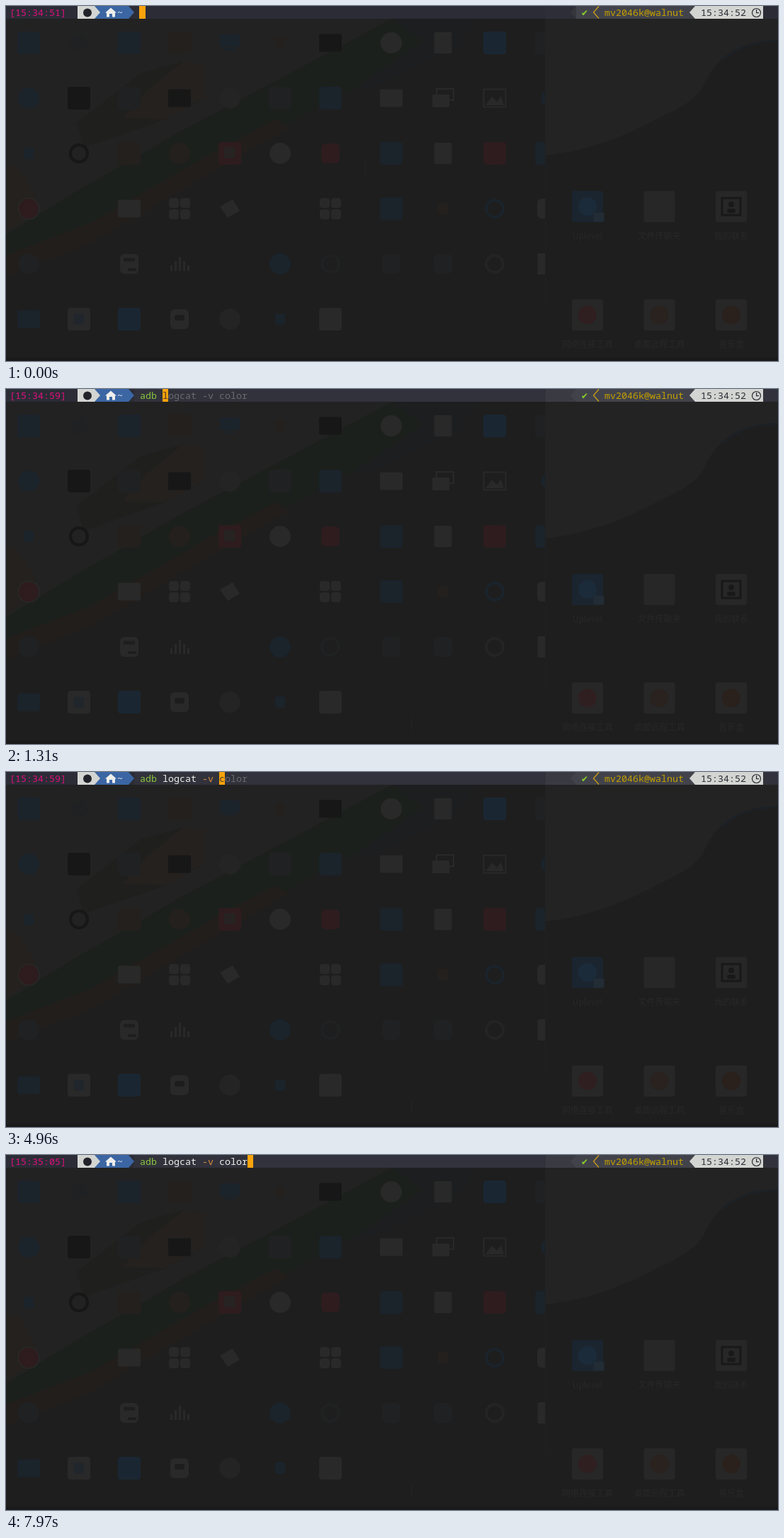
An HTML page with a canvas that plays this animation: 1090x501 px, repeating every 8 s.

```html
<!DOCTYPE html>
<html lang="en">
<head>
<meta charset="utf-8">
<title>Terminal</title>
<style>
  html, body { margin: 0; width: 100%; height: 100%; overflow: hidden; background: #1e1e1e; }
  canvas { display: block; width: 1090px; height: 501px; }
</style>
</head>
<body>
<canvas id="stage" width="1090" height="501"></canvas>
<script>
const W = 1090, H = 501, LOOP = 8000, CELL = 8, BAR = 18, INPUT_X = 189;
const MONO = '13.33px "Noto Sans Mono", "DejaVu Sans Mono", monospace';
const COMMAND = 'adb logcat -v color';

const stage = document.getElementById('stage').getContext('2d');
const backdrop = document.createElement('canvas');
backdrop.width = W;
backdrop.height = H;
let g = backdrop.getContext('2d');

function rect(x, y, w, h, color) {
  g.fillStyle = color;
  g.fillRect(x, y, w, h);
}

function poly(color, ...pts) {
  g.fillStyle = color;
  g.beginPath();
  for (let i = 0; i < pts.length; i += 2) g.lineTo(pts[i], pts[i + 1]);
  g.fill();
}

function disc(x, y, r, color) {
  g.fillStyle = color;
  g.beginPath();
  g.arc(x, y, r, 0, 7);
  g.fill();
}

function ring(x, y, r, color, width) {
  g.strokeStyle = color;
  g.lineWidth = width;
  g.beginPath();
  g.arc(x, y, r, 0, 7);
  g.stroke();
}

function box(x, y, w, h, r, color) {
  g.fillStyle = color;
  g.beginPath();
  g.roundRect(x - w / 2, y - h / 2, w, h, r);
  g.fill();
}

function frame(x, y, w, h, color, width = 2) {
  g.strokeStyle = color;
  g.lineWidth = width;
  g.strokeRect(x - w / 2, y - h / 2, w, h);
}

function text(str, x, y, color, font = MONO) {
  g.font = font;
  g.fillStyle = color;
  g.fillText(str, x, y);
}

// ---- dimmed desktop ----

const TINT = {
  l: '#292929', g: '#242424', k: '#171717', b: '#1b232b',
  B: '#1a2733', r: '#2e1c1e', n: '#24201d', f: '#202122'
};

const SHAPE = {
  s: (x, y, c) => box(x, y, 32, 32, 4, c),
  h: (x, y, c) => box(x, y, 26, 28, 6, c),
  t: (x, y, c) => box(x, y, 14, 16, 3, c),
  c: (x, y, c) => disc(x, y, 15, c),
  w: (x, y, c) => box(x, y, 32, 25, 2, c),
  p: (x, y, c) => box(x, y, 25, 30, 2, c),
  o: (x, y, c) => ring(x, y, 12, c, 4),
  d: (x, y, c) => poly(c, x - 14, y - 3, x + 4, y - 13, x + 14, y + 3, x - 3, y + 13),
  e: (x, y, c) => frame(x, y, 30, 26, c),
  // monitor
  m: (x, y, c) => { box(x, y - 3, 28, 18, 2, c); box(x, y + 9, 14, 3, 1, c); },
  // stacked windows
  v: (x, y, c) => { frame(x + 3, y - 5, 24, 16, c); box(x - 3, y + 4, 24, 18, 1, c); },
  // picture
  i: (x, y, c) => { frame(x, y, 31, 25, c); poly(c, x - 13, y + 10, x - 4, y - 2, x + 3, y + 5, x + 9, y - 3, x + 13, y + 10); },
  // level bars
  a: (x, y, c) => { for (let k = -2; k < 3; k++) { const h = 20 - 6 * Math.abs(k); rect(x + k * 6 - 1, y + 10 - h, 3, h, c); } },
  // four tiles
  q: (x, y, c) => { for (const u of [-8, 8]) for (const v of [-8, 8]) box(x + u, y + v, 14, 14, 4, c); }
};

const ICONS = [
  'sb df sb sn mb tn wk cl pl sB sf',
  'cb sk sf wk cg sf sb wl vl il tb',
  'tb ok sn cn sr cl hr sb pl sr sb',
  'or .. wl ql dl .. ql sb tn ob hl',
  'cf .. hl al .. cb of hf hf og pl',
  'wb sl sB hl cg tb sl'
];

function drawWallpaper() {
  rect(0, 0, W, H, '#1e1e1e');
  g.save();
  g.beginPath();
  g.rect(0, BAR, 762, H - BAR);
  g.clip();
  poly('#222222', 0, BAR, 545, BAR, 420, 85, 240, 180, 0, 325);
  poly('#1f1f1e', 100, 165, 190, 95, 250, 78, 282, 82, 280, 130, 225, 160, 110, 200);
  poly('#24211e', 165, 158, 200, 118, 250, 78, 282, 82, 282, 128, 225, 160);
  poly('#24211e', 0, 222, 18, 228, 42, 268, 30, 300, 0, 318);
  poly('#1c201c', 0, 322, 110, 255, 240, 182, 420, 85, 545, BAR, 632, BAR, 500, 112, 300, 218, 130, 318, 0, 372);
  poly('#221e1c', 0, 352, 120, 306, 290, 208, 380, 160, 400, 172, 290, 235, 120, 335, 0, 382);
  poly('#1c1e20', 545, BAR, 662, BAR, 640, 55, 520, 115, 490, 118, 590, 50);
  g.restore();

  g.fillStyle = '#232323';
  g.beginPath();
  g.moveTo(762, BAR);
  g.lineTo(762, 211);
  g.bezierCurveTo(835, 202, 880, 180, 930, 154);
  g.bezierCurveTo(1000, 122, 975, 110, 1010, 76);
  g.bezierCurveTo(1032, 55, 1060, 49, W, 48);
  g.lineTo(W, BAR);
  g.fill();
  g.strokeStyle = '#1c2126';
  g.lineWidth = 3;
  g.beginPath();
  g.moveTo(1012, 76);
  g.bezierCurveTo(1034, 56, 1060, 50, W, 49);
  g.stroke();
  rect(761, BAR, 1, 405, '#212121');
  rect(0, 496, W, 5, '#1a1a1a');
}

function drawIcons() {
  g.save();
  g.beginPath();
  g.rect(0, BAR, 761, H);
  g.clip();
  ICONS.forEach((row, r) => row.split(' ').forEach((code, c) => {
    if (code === '..') return;
    const x = c < 7 ? 32 + c * 71 : 544 + (c - 7) * 73;
    SHAPE[code[0]](x, 52 + r * 78, TINT[code[1]]);
  }));
  ring(32, 286, 15, '#292929', 1.5);
  disc(32, 286, 10, TINT.r);
  box(316, 207, 16, 16, 2, '#272323');
  box(174, 358, 16, 5, 1, '#1e1e1e');
  box(178, 372, 12, 4, 1, '#1e1e1e');
  box(103, 442, 15, 15, 3, '#20262b');
  box(245, 440, 14, 8, 3, '#1d1d1d');
  g.restore();
}

function drawShortcuts() {
  const labels = [['Uplevel', '文件传输夹', '我的联系'], ['网络连接工具', '桌面远程工具', '音乐盒']];
  const inner = ['#1c2b3a', '#282828', '#191919', '#301f20', '#29221e', '#2a201c'];
  g.textAlign = 'center';
  labels.forEach((row, r) => row.forEach((label, c) => {
    const x = 821 + c * 101.5, y = 283 + r * 153, k = r * 3 + c;
    box(x, y, 44, 44, 3, k ? '#272727' : '#1b2530');
    if (k === 2) {
      frame(x, y, 26, 24, inner[k], 3);
      disc(x, y - 3, 4, inner[k]);
      box(x, y + 6, 12, 6, 3, inner[k]);
    } else if (k !== 1) {
      disc(x, y, 13, inner[k]);
    }
    text(label, x, y + 46, '#282828', '12px "Noto Sans CJK SC", "Noto Sans CJK", sans-serif');
  }));
  box(837, 298, 15, 13, 2, '#222c35');
  g.textAlign = 'left';
}

// ---- prompt ----

function arrowRight(x, color) { poly(color, x, 0, x + 8, BAR / 2, x, BAR); }
function arrowLeft(x, color) { poly(color, x, 0, x - 8, BAR / 2, x, BAR); }

function drawBar(t) {
  const settled = t >= 1310;
  rect(0, 0, W, BAR, '#2b2c36');
  if (settled) {
    rect(181, 0, 581, BAR, '#31323b');
    rect(1069, 0, 21, BAR, '#31323b');
  }
  rect(762, 0, 43, BAR, settled ? '#3a3b42' : '#2d2e37');

  rect(101, 0, 24, BAR, '#d3d5d2');
  rect(125, 0, 48, BAR, '#3b66a3');
  arrowRight(125, '#d3d5d2');
  arrowRight(173, '#3b66a3');
  disc(115, 9.5, 6, '#22222a');
  poly('#eeeeec', 140, 9.5, 148, 2.5, 156, 9.5, 154, 9.5, 154, 15.5, 150, 15.5, 150, 11, 146, 11, 146, 15.5, 142, 15.5, 142, 9.5);
  text('~', 157, 14, '#eeeeec');

  arrowLeft(805, settled ? '#42434a' : '#36373d');
  rect(805, 0, 168, BAR, '#42434a');
  text('✔', 812, 14, '#8ad22c', '12px "DejaVu Sans", sans-serif');
  g.strokeStyle = '#d0a018';
  g.lineWidth = 1.2;
  g.beginPath();
  g.moveTo(837, 0.5);
  g.lineTo(829.5, 9);
  g.lineTo(837, 17.5);
  g.stroke();
  text('mv2046k@walnut', 845, 14, '#c4a000');

  rect(973, 0, 96, BAR, '#d3d5d2');
  arrowLeft(973, '#d3d5d2');
  text('15:34:52', 981, 14, '#2b2b33');
  ring(1059.5, 9.5, 6, '#2b2b33', 1.2);
  rect(1059, 5, 1.2, 5, '#2b2b33');
  rect(1059, 9, 4, 1.2, '#2b2b33');
}

// Key presses: time and the number of command letters typed so far.
const KEYS = [
  [0, 0], [920, 1], [1110, 2], [1160, 3], [1310, 4], [2300, 5], [2520, 6], [2800, 7],
  [3030, 8], [3280, 9], [3400, 10], [3510, 11], [4450, 12], [4820, 13], [4960, 14],
  [6640, 15], [7020, 16], [7260, 17], [7450, 18], [7970, 19]
];

function clockText(t) {
  if (t < 920) return '15:34:51';
  if (t < 5620) return '15:34:59';
  return t < 6320 ? '15:35:04' : '15:35:05';
}

function letterColor(i, typed) {
  if (i >= typed) return '#6b6c71';
  if (i < 3) return typed < 3 ? '#e0107c' : '#8ac43f';
  return i === 12 || i === 13 || i === 11 ? '#dc8a3c' : '#eeeeec';
}

function drawInput(t) {
  let typed = KEYS.filter(k => k[0] <= t).pop()[1];
  let line = typed ? COMMAND : '';
  // one wrong key, soon erased
  if (t >= 5620 && t < 6320) {
    line = COMMAND.slice(0, 14) + 'v';
    typed = 15;
  }
  const cursorX = INPUT_X + typed * CELL;
  const left = t < 370 ? cursorX - 1 : cursorX;
  rect(left, 0, cursorX + CELL - left, BAR, '#faa30c');
  [...line].forEach((ch, i) => {
    text(ch, INPUT_X + i * CELL, 14, i === typed ? '#4a3c24' : letterColor(i, typed));
  });
  text('[' + clockText(t) + ']', 5, 14, '#e0107c');
}

function drawPopup() {
  rect(186, 18, 100, 24, '#1c1c1c');
  frame(236, 30, 99, 23, '#4c4c4c', 1);
  text('a', 189, 35, '#f0f0f0', 'bold ' + MONO);
  text('db', 197, 35, '#c8c8c8');
  rect(266, 19, 19, 22, '#f08080');
  text('h', 272, 35, '#ffffff');
}

function drawPointer(t) {
  const step = t < 90 ? 0 : Math.min(4, 1 + Math.floor((t - 90) / 46.7));
  const x = Math.round(507 + 65 * step / 4), y = Math.round(229 + 244 * step / 4);
  rect(x, y - 9, 1, 18, '#232323');
}

function draw(now) {
  const t = now % LOOP;
  g.drawImage(backdrop, 0, 0);
  drawPointer(t);
  drawBar(t);
  drawInput(t);
  if (t >= 1110 && t < 1230) drawPopup();
}

drawWallpaper();
drawIcons();
drawShortcuts();
g = stage;

let start = null;
function tick(now) {
  if (start === null) start = now;
  draw(now - start);
  requestAnimationFrame(tick);
}
draw(0);
requestAnimationFrame(tick);
</script>
</body>
</html>
```
